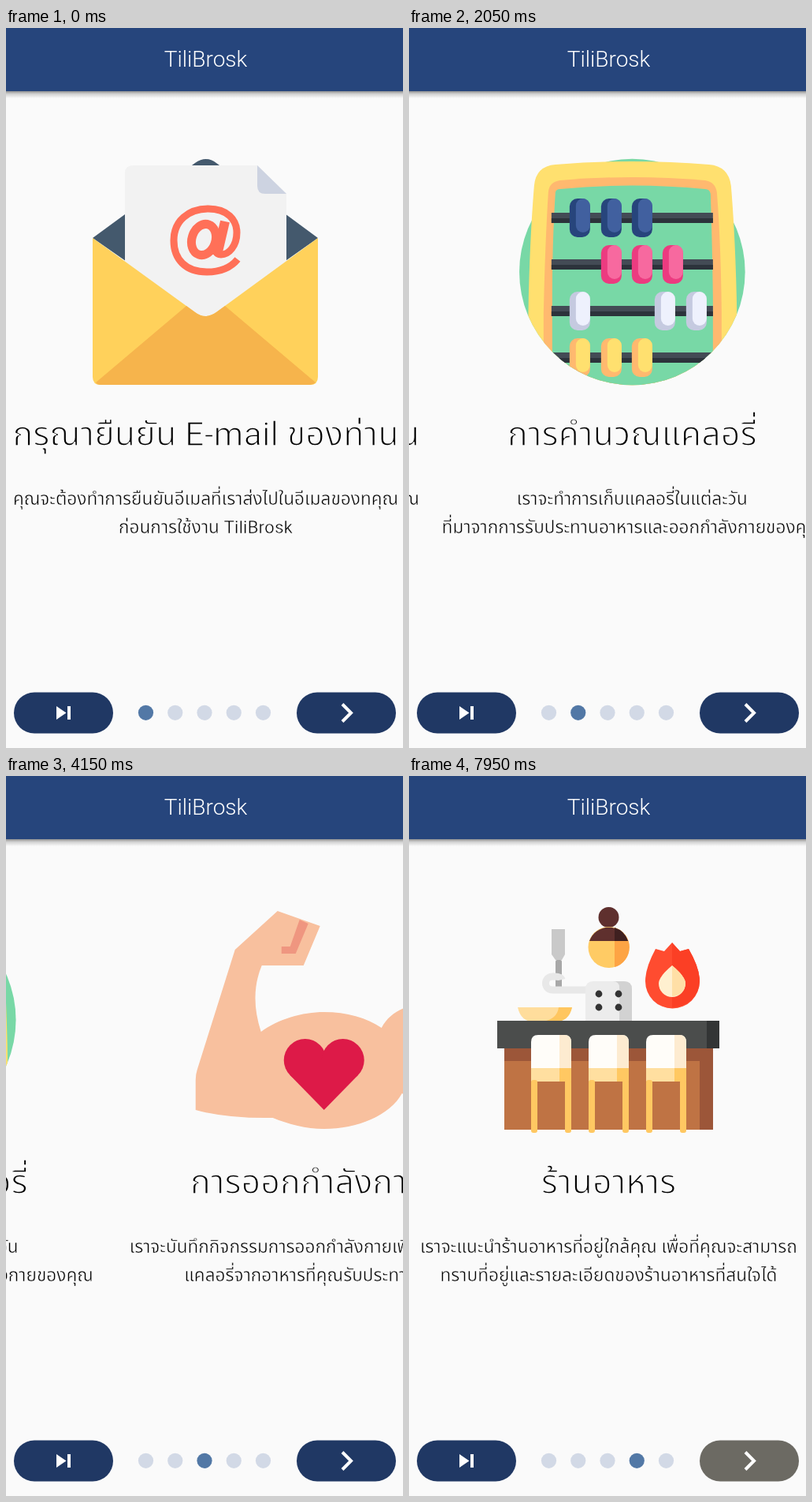
Recreate the animation shown at these times as an HTML page. Size 504 by 912 pixels, loop 8 s.

```html
<!DOCTYPE html>
<html lang="th">
<head>
<meta charset="utf-8">
<style>
html, body { margin: 0; width: 100%; height: 100%; overflow: hidden; background: #fafafa; }
svg { display: block; width: 100%; height: 100%; }
/* the background-coloured stroke thins the letters to a light weight */
text { font: 400 22.6px Roboto, "Noto Sans Thai", "Noto Sans", sans-serif; text-anchor: middle; white-space: pre;
  stroke: #fafafa; stroke-width: .6px; }
.title { font-size: 43.2px; stroke-width: 1.7px; }
.bar { font-size: 28px; font-weight: 300; fill: #fff; stroke: none; }
</style>
</head>
<body>
<svg id="stage" viewBox="0 0 504 912"></svg>
<script>
const PAGE = 515, LOOP = 8000, SLIDE = 350;
const NAVY = '#203864', DOT = '#d2d9e6', ACTIVE = '#5278a6', PRESSED = [108, 106, 99];
const slides = [1805, 3994, 5755];
const presses = [...slides, 8010];

const path = (d, fill, extra = '') => `<path d="${d}" fill="${fill}" ${extra}/>`;
const rect = (x, y, w, h, fill, r = 0) =>
  `<rect x="${x}" y="${y}" width="${w}" height="${h}" rx="${r}" fill="${fill}"/>`;
const circle = (x, y, r, fill) => `<circle cx="${x}" cy="${y}" r="${r}" fill="${fill}"/>`;
const text = (x, y, s, cls = '') => `<text x="${x}" y="${y}" class="${cls}">${s}</text>`;

function envelope() {
  const line = 'fill="none" stroke="#ff7058"';
  return path('M110 266L240 171Q254 161 267 171L396 266L254 366Z', '#44596d') +
    path('M151 184Q151 174 161 174H319L356 210V296L267 361Q253 371 240 361L151 296Z', '#f2f2f2') +
    path('M319 174L356 210H329Q319 210 319 200Z', '#cdd3e1') +
    path('M110 266L240 360Q253 370 267 360L396 266V442Q396 452 386 452H120Q110 452 110 442Z', '#ffd15b') +
    path('M114 449L229 352L240 360Q253 370 267 360L278 352L393 449Q390 452 386 452H120Q116 452 114 449Z', '#f6b44c') +
    `<path d="M294 293C285 304 272 309 255 309C228 309 213 293 213 269C213 244 232 229 257 229
      C281 229 293 243 293 259C293 276 283 287 273 287C266 287 265 282 267 275" ${line} stroke-width="9"/>
    <path d="M278 245L268 288" ${line} stroke-width="12"/>
    <ellipse cx="251" cy="268" rx="15" ry="20" transform="rotate(18 251 268)" ${line} stroke-width="11"/>`;
}

function abacus() {
  const rows = [
    [216, [174, 214, 253], '#41609f', '#27457c'],
    [275, [214, 253, 292], '#f7699f', '#ec3b80'],
    [334, [174, 282, 322], '#eef1fd', '#c5cae0'],
    [393, [174, 214, 253], '#ffe06f', '#ffb96f']
  ];
  const beads = rows.map(([y, xs, light, dark]) =>
    rect(151, y + 18, 205, 13, '#434b55') + rect(151, y + 25, 205, 6, '#2c333b') +
    xs.map(x => rect(x, y, 26, 49, dark, 10) + rect(x + 8, y, 18, 43, light, 9)).join('')).join('');
  return circle(253.5, 309, 143.3, '#78d8a6') + '<g clip-path="url(#round)">' +
    path('M120 460L122 340Q124 260 129 200Q131 175 156 173Q253 165 351 173Q376 175 379 200Q384 260 386 340L388 460Z', '#ffe06f') +
    path('M141 460V360Q143 270 147 208Q148 195 162 193Q253 185 346 193Q359 195 361 208Q366 270 367 360V460Z', '#ffb96f') +
    path('M152 460V340Q152 270 156 208Q157 204 162 204Q253 195 346 204Q352 204 353 210Q355 270 356 340V460Z', '#78d8a6') +
    beads + '</g>';
}

function arm() {
  const red = '#dd1a48';
  return path(`M214 171L268 190L247 240H194Q178 278 193 324C215 308 245 299 273 299C302 299 327 306 346 319
      C356 300 376 290 397 290V408Q383 408 372 402C357 430 315 447 273 447C250 447 228 441 208 433
      Q150 434 110 423V385Q110 378 112 372L160 220Z`, '#f8c09e') +
    path('M242 182L253 187L237 225H219V216H230Z', '#ef9680') +
    circle(249, 360, 27, red) + circle(297, 360, 27, red) +
    path('M273 423L229.9 379.1L249 360H297L316.1 379.1Z', red);
}

function stool(x) {
  return path(`M${x} 370V337Q${x} 328 ${x + 9} 328H${x + 42}Q${x + 51} 328 ${x + 51} 337V370Z`, '#fffdf9') +
    path(`M${x + 36} 370V328H${x + 42}Q${x + 51} 328 ${x + 51} 337V370Z`, '#fdebd0') +
    rect(x, 370, 51, 17, '#ffdfa0') + rect(x + 36, 370, 15, 17, '#ffc862') +
    rect(x, 385, 8, 67, '#ffc862', 3) + rect(x + 43, 385, 8, 67, '#ffc862', 3);
}

function kitchen() {
  return circle(253.5, 179, 13, '#5f302e') +
    circle(253.5, 217, 26, '#ffcb64') +
    path('M261 192A26 26 0 0 1 261 242Z', '#fda444') +
    path('M229 209A26 26 0 0 1 278 209Z', '#5f302e') +
    path('M261 209V192A26 26 0 0 1 278 209Z', '#3f2020') +
    path('M181 194H198V226L194 233H186L181 226Z', '#c9c9c9') +
    rect(186, 233, 8, 42, '#a8a8a8', 2) +
    '<path d="M194 258Q193 254 185 254H182A8 8 0 0 0 182 271H228" fill="none" stroke="#e8e8e8" stroke-width="9"/>' +
    path('M224 311V270Q224 260 234 260H273Q283 260 283 270V311Z', '#ececec') +
    path('M267 311V268Q267 260 259 260H273Q283 260 283 270V311Z', '#d2d2d2') +
    [276, 293].map(y => circle(241, y, 4.4, '#333') + circle(266, y, 4.4, '#333')).join('') +
    path('M138 293H207Q203 311 186 311H158Q142 311 138 293Z', '#ffdd9c') +
    path('M190 293H207Q203 311 186 311H170Q188 308 190 293Z', '#ffc65f') +
    path('M334 211L344 222L355 219Q369 243 369 260A34 34 0 0 1 300 260Q300 243 313 219L324 222Z', '#ff4c30') +
    path('M334 211L344 222L355 219Q369 243 369 260A34 34 0 0 1 334 293Z', '#fb3f25') +
    path('M334 240Q351 254 351 263A17 17 0 0 1 317 263Q317 254 334 240Z', '#fff0d0') +
    path('M334 240Q351 254 351 263A17 17 0 0 1 334 279Z', '#ffdfa6') +
    rect(121, 345, 265, 103, '#bf7344') + rect(121, 345, 265, 16, '#9c5639') + rect(369, 345, 17, 103, '#9c5639') +
    rect(112, 310, 282, 35, '#4b4d4c') + rect(378, 310, 16, 35, '#333535') +
    [155, 228, 301].map(stool).join('');
}

const pages = [
  [envelope, 'กรุณายืนยัน E-mail ของท่าน',
    'คุณจะต้องทำการยืนยันอีเมลที่เราส่งไปในอีเมลของทคุณ', 'ก่อนการใช้งาน TiliBrosk'],
  [abacus, 'การคำนวณแคลอรี่',
    'เราจะทำการเก็บแคลอรี่ในแต่ละวัน', 'ที่มาจากการรับประทานอาหารและออกกำลังกายของคุณ'],
  [arm, 'การออกกำลังกาย',
    'เราจะบันทึกกิจกรรมการออกกำลังกายเพื่อลดจำนวน', 'แคลอรี่จากอาหารที่คุณรับประทานไป'],
  [kitchen, 'ร้านอาหาร',
    'เราจะแนะนำร้านอาหารที่อยู่ใกล้คุณ เพื่อที่คุณจะสามารถ', 'ทราบที่อยู่และรายละเอียดของร้านอาหารที่สนใจได้']
];

const stage = document.getElementById('stage');
stage.innerHTML = `<defs>
    <clipPath id="round"><path d="M90 150H420V309H396.8A143.3 143.3 0 0 1 110.2 309H90Z"/></clipPath>
    <linearGradient id="shade" x2="0" y2="1">
      <stop stop-opacity=".42"/><stop offset=".4" stop-opacity=".16"/><stop offset="1" stop-opacity="0"/>
    </linearGradient>
  </defs>` + rect(0, 0, 504, 912, '#fafafa') +
  pages.map(([draw, title, a, b], i) => `<g class="page" transform="translate(${i * PAGE})">` +
    draw() + text(253.5, 529, title, 'title') + text(253.5, 604, a) + text(253.5, 640, b) + '</g>').join('') +
  rect(0, 80, 504, 9, 'url(#shade)') + rect(0, 0, 504, 80, '#26457c') +
  text(253.5, 49, 'TiliBrosk', 'bar') +
  rect(10, 841.5, 126, 52, NAVY, 26) + path('M64 859V876L76.5 867.5ZM78 859H82V876H78Z', '#fff') +
  `<g id="next">${rect(369, 841.5, 126, 52, NAVY, 26)}</g>` +
  '<path d="M427 856.5L438 867.5L427 878.5" fill="none" stroke="#fff" stroke-width="4"/>' +
  [0, 1, 2, 3, 4].map(i => `<g class="dot">${circle(177.5 + i * 37.25, 867.3, 9.6, DOT)}</g>`).join('');

const groups = [...stage.querySelectorAll('.page')];
const dots = [...stage.querySelectorAll('.dot circle')];
const next = stage.querySelector('#next rect');
const clamp = v => Math.min(1, Math.max(0, v));

// cubic-bezier(.25, .1, .25, 1), solved by bisection
function ease(x) {
  if (x <= 0 || x >= 1) return clamp(x);
  const bez = (a, b, u) => 3 * a * u * (1 - u) ** 2 + 3 * b * u * u * (1 - u) + u ** 3;
  let lo = 0, hi = 1;
  for (let i = 0; i < 20; i++) {
    const mid = (lo + hi) / 2;
    if (bez(.25, .25, mid) < x) lo = mid; else hi = mid;
  }
  return bez(.1, 1, lo);
}

function render(t) {
  const pos = slides.reduce((sum, s) => sum + ease((t - s) / SLIDE), 0);
  const current = slides.filter(s => t >= s).length;
  groups.forEach((g, i) => g.setAttribute('transform', `translate(${(i - pos) * PAGE})`));
  dots.forEach((d, i) => d.setAttribute('fill', i === current ? ACTIVE : DOT));
  const press = Math.max(...presses.map(s => Math.min(clamp((t - s + 160) / 90), clamp((s + 80 - t) / 80))));
  const mix = [32, 56, 100].map((c, i) => Math.round(c + (PRESSED[i] - c) * press));
  next.setAttribute('fill', `rgb(${mix})`);
}

const start = performance.now();
function tick() {
  render((performance.now() - start) % LOOP);
  requestAnimationFrame(tick);
}
tick();
</script>
</body>
</html>
```
